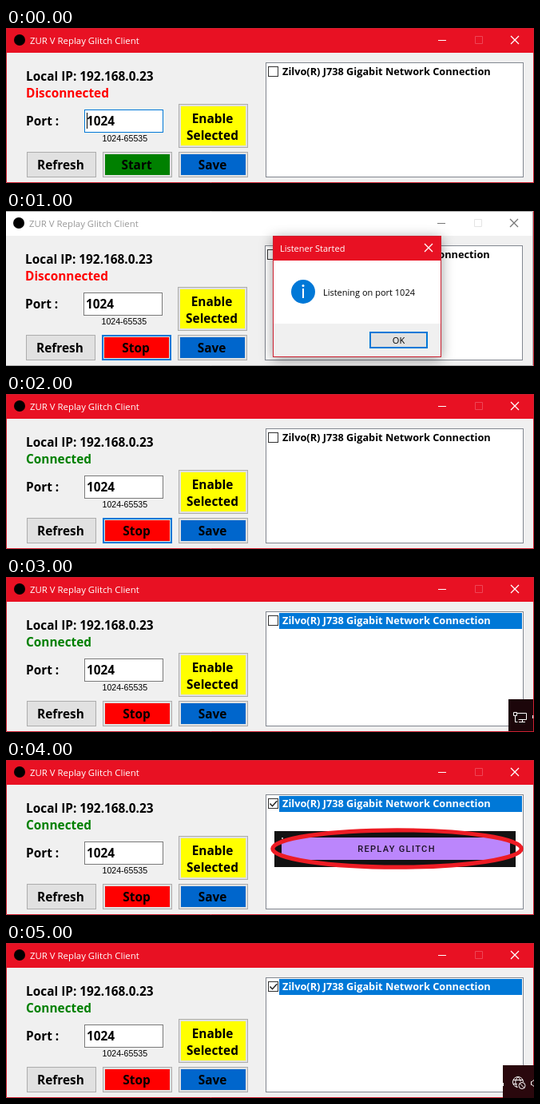
Animation of 661x194 px, one loop 6 s. Source, as an HTML page:

```html
<!DOCTYPE html>
<html lang="en">
<head>
<meta charset="utf-8">
<title>Replay client</title>
<style>
  html, body { margin: 0; width: 100%; height: 100%; overflow: hidden; background: #f0f0f0; }
  svg { display: block; }
  text { font: 11.4px "Open Sans", "Noto Sans", sans-serif; }
  .bold { font-size: 15.4px; font-weight: 700; }
  .row { font-size: 12.75px; font-weight: 700; }
  .hint { font: 10.6px "Liberation Sans", sans-serif; }
  .small { font-size: 11px; }
  .caps { font: 500 11px Roboto, sans-serif; letter-spacing: 1.35px; }
  .mid { text-anchor: middle; }
</style>
</head>
<body>
<svg id="stage" width="661" height="194" viewBox="0 0 661 194"></svg>
<script>
const RED = '#e81123', EDGE = '#cc2030', BLUE = '#0078d7';
const STEP = 1000;
const scenes = [
  { status: 'Disconnected', caret: true },
  { status: 'Disconnected', running: true, focus: true, dialog: true },
  { status: 'Connected', running: true, focus: true },
  { status: 'Connected', running: true, selected: true, tray: monitorTray },
  { status: 'Connected', running: true, selected: true, checked: true, overlay: true },
  { status: 'Connected', running: true, selected: true, checked: true, tray: globeTray },
];

const rect = (x, y, w, h, fill, extra = '') =>
  `<rect x="${x}" y="${y}" width="${w}" height="${h}" fill="${fill}" ${extra}/>`;
const text = (x, y, value, cls = '', fill = '#000') =>
  `<text x="${x}" y="${y}" class="${cls}" fill="${fill}">${value}</text>`;
const line = (d, color, width = 1) =>
  `<path d="${d}" fill="none" stroke="${color}" stroke-width="${width}"/>`;
const framed = (x, y, w, h, fill, border, b = 1) =>
  rect(x, y, w, h, border) + rect(x + b, y + b, w - 2 * b, h - 2 * b, fill);
const cross = (x, y, color) => line(`M${x} ${y}l10 10m0 -10l-10 10`, color, 1.3);

function button(x, y, h, labels, color, focus) {
  const face = framed(x, y, 87, h, '#e1e1e1', focus ? BLUE : '#adadad', focus ? 2 : 1);
  const fill = color ? rect(x + 3, y + 3, 81, h - 6, color) : '';
  const first = y + Math.ceil(h / 2) + 6 - (labels.length - 1) * 10.5;
  return face + fill +
    labels.map((s, i) => text(x + 42.5, first + i * 21, s, 'bold mid')).join('');
}

function titleBar(active) {
  const ink = active ? '#fff' : '#777';
  return rect(0, 0, 661, 31, active ? RED : '#fff') +
    '<circle cx="17" cy="15" r="7" fill="#000"/>' +
    text(30, 20, 'ZUR V Replay Glitch Client', '', active ? '#fff' : '#999') +
    line('M541 15.5h10', ink) +
    line('M587.5 10.5h9v9h-9z', active ? '#ee4656' : '#e4e4e4') +
    cross(632, 10, ink);
}

function adapterList({ selected, checked }) {
  return framed(325, 43, 323, 144, '#fff', '#828790') +
    (selected ? rect(342, 45, 304, 20, BLUE) : '') +
    framed(328, 48, 13, 13, '#fff', '#333') +
    (checked ? line('M330.5 54.5l3 3.2l5.8 -6.4', '#222', 1.5) : '') +
    text(346, 59, 'Zilvo(R) J738 Gigabit Network Connection', 'row', selected ? '#fff' : '#000');
}

function clientWindow(s) {
  return titleBar(!s.dialog) +
    text(25, 66, 'Local IP: 192.168.0.23', 'bold') +
    text(25, 87, s.status, 'bold', s.status === 'Connected' ? '#008000' : '#f00') +
    text(25, 122, 'Port :', 'bold') +
    framed(98, 102, 99, 29, '#fff', s.caret ? BLUE : '#7a7a7a') +
    text(101, 122, '1024', 'bold') +
    (s.caret ? rect(101, 106, 1, 20, '#000') : '') +
    text(120.5, 142, '1024-65535', 'hint') +
    button(216, 95, 55, ['Enable', 'Selected'], '#ff0') +
    button(26, 155, 32, ['Refresh']) +
    button(121, 155, 32, [s.running ? 'Stop' : 'Start'], s.running ? '#f00' : '#008000', s.focus) +
    button(216, 155, 32, ['Save'], '#0066cc') +
    adapterList(s) +
    line('M.5 .5h660v193h-660z', s.dialog ? '#aaa' : EDGE);
}

function dialog() {
  return '<g style="filter:drop-shadow(0 3px 8px rgba(0,0,0,.4))">' +
    framed(334, 31, 211, 152, '#fff', EDGE) + '</g>' +
    rect(335, 32, 209, 30, RED) +
    rect(335, 141, 209, 41, '#f0f0f0') +
    text(343, 51, 'Listener Started', 'small', '#fff') +
    cross(524, 41, '#fff') +
    '<circle cx="372" cy="101" r="15" fill="#0078d7"/>' +
    rect(371, 97, 2, 12, '#fff') +
    '<circle cx="372" cy="93.5" r="1.5" fill="#fff"/>' +
    text(397, 105.5, 'Listening on port 1024', 'small') +
    framed(455, 151, 73, 21, '#e1e1e1', BLUE, 2) +
    text(491.5, 166, 'OK', 'small mid');
}

function overlay() {
  const oval = 'cx="489.5" cy="111" rx="155.7" ry="23.2"';
  return `<clipPath id="oval"><ellipse ${oval}/></clipPath>` +
    rect(336, 89, 302, 45, '#121212') +
    rect(345, 97, 286, 28, '#bb86fc', 'clip-path="url(#oval)"') +
    rect(345, 97, 2, 2, '#aaa') +
    text(489, 115, 'REPLAY GLITCH', 'caps mid', '#1b1226') +
    `<ellipse ${oval} fill="none" stroke="#ed1c24" stroke-width="5.2"/>`;
}

function monitorTray() {
  return rect(629, 153, 31, 40, '#1c060a') +
    line('M640 170.5h11.5v8h-10M646.5 178.5v3M642 181.5h8', '#fff') +
    line('M635.5 169.5h4v4h-4zM637.5 173.5v8h3', '#fff') +
    rect(659, 173, 1, 4, '#fff');
}

function globeTray() {
  return rect(622, 153, 39, 41, '#2a080d') +
    line('M634.5 174a6.5 6.5 0 1 1 13 0M634.5 174a6.5 6.5 0 0 0 6 6.5' +
      'M641 167.5c-4 4 -4 9 -1 13M641 167.5c2 2 3 4 3 6M635 171.5h12M635 176.5h5', '#fff') +
    '<circle cx="646" cy="178.5" r="4" fill="#2a080d" stroke="#fff"/>' +
    line('M643.3 175.8l5.4 5.4', '#fff') +
    rect(622, 175, 1, 4, '#fff') +
    line('M661 171.5l-2.5 2h-1v4h1l2.5 2', '#fff');
}

function draw(s) {
  return rect(0, 0, 661, 194, '#f0f0f0') +
    rect(660, 0, 1, 194, EDGE) +
    `<g transform="translate(${s.dialog ? -1 : 0})">${clientWindow(s)}</g>` +
    (s.dialog ? dialog() : '') +
    (s.overlay ? overlay() : '') +
    (s.tray ? s.tray() : '');
}

const stage = document.getElementById('stage');
const start = performance.now();
let shown = -1;
function tick() {
  const index = Math.floor((performance.now() - start) / STEP) % scenes.length;
  if (index !== shown) {
    stage.innerHTML = draw(scenes[index]);
    shown = index;
  }
  requestAnimationFrame(tick);
}
tick();
</script>
</body>
</html>
```
